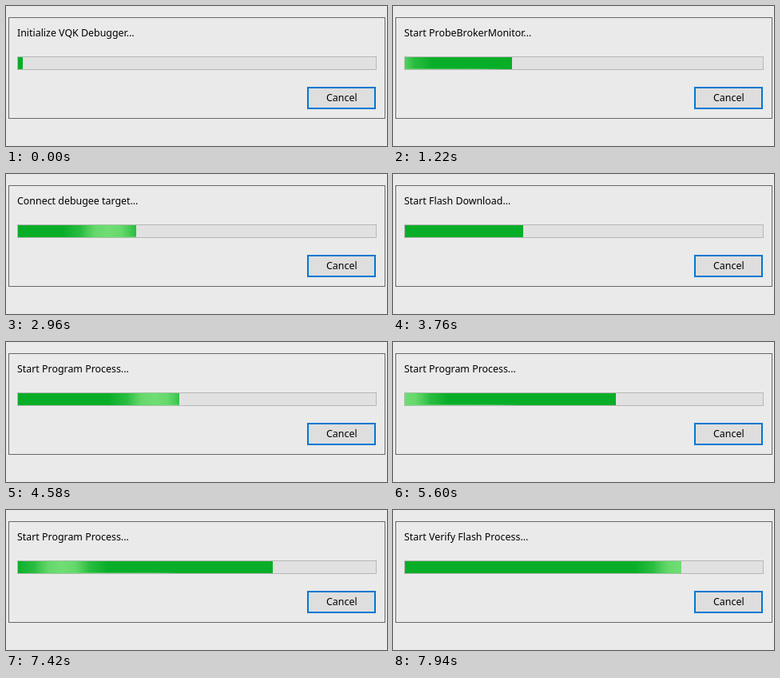
These frames come from a looping animation (477x175 px, 8 s). An HTML page with a canvas:

```html
<!DOCTYPE html>
<html lang="en">
<head>
<meta charset="utf-8">
<title>Progress dialog</title>
<style>
html, body { margin: 0; width: 100%; height: 100%; overflow: hidden; background: #eaeaea; }
canvas { position: absolute; left: 0; top: 0; }
span {
  position: absolute; white-space: pre; color: #000;
  font: 12.4px/16px "Noto Sans", "Open Sans", sans-serif;
}
#label { left: 14px; top: 26px; }
#cancel { left: 401px; top: 107px; }
</style>
</head>
<body>
<canvas id="stage" width="477" height="175"></canvas>
<span id="label"></span>
<span id="cancel">Cancel</span>
<script>
const LOOP = 8000, STEP = 100;
const GLOW_SPEED = 0.58, GLOW_HALF = 57, GLOW_LEAD = 150;
const GREEN = '#09ae28';
const ctx = document.getElementById('stage').getContext('2d');
const label = document.getElementById('label');

// [start time, message]
const messages = [
  [0, 'Initialize VQK Debugger...'],
  [100, 'Start ProbeBrokerMonitor...'],
  [1420, 'Connect debugee target...'],
  [3760, 'Start Flash Download...'],
  [4460, 'Start Program Process...'],
  [7520, 'Start Verify Flash Process...']
];

// [time, chunks done], linear in between
const progress = [
  [0, 1], [700, 20], [1620, 20], [2020, 22], [3740, 22], [4140, 24],
  [4960, 36], [5280, 38.3], [7220, 46.2], [7920, 51]
];

// [start time, glow centre at that time]
const sweeps = [[0, 400], [1220, -8], [2640, -46], [4160, -46], [5500, -46], [7220, -46]];

const latest = (list, t) => list.filter(([start]) => start <= t).pop();

function fillEdge(t) {
  const [t0, n0] = latest(progress, t);
  const [t1, n1] = progress.find(([time]) => time > t) || [LOOP, n0];
  const chunks = Math.floor(n0 + (n1 - n0) * (t - t0) / (t1 - t0));
  return Math.max(21, Math.round(12.55 + 6.83 * chunks));
}

function box(x, y, w, h, fill) {
  ctx.fillStyle = fill;
  ctx.fillRect(x, y, w, h);
}

function frame(x, y, w, h, line, edge, fill) {
  box(x, y, w, h, edge);
  box(x + line, y + line, w - 2 * line, h - 2 * line, fill);
}

function gradient(from, to, stops) {
  const g = ctx.createLinearGradient(from, 0, to, 0);
  for (const [pos, alpha] of stops) g.addColorStop(pos, `rgba(112,221,116,${alpha})`);
  return g;
}

function drawGlow(center, edge) {
  const rise = [[0, 0], [0.2, 0.25], [0.36, 0.85], [0.5, 1]];
  const fall = rise.map(([pos, alpha]) => [1 - pos, alpha]);
  const g = gradient(center - GLOW_HALF, center + GLOW_HALF, [...rise, ...fall]);
  box(15, 64, edge - 15, 15, g);
  ctx.globalAlpha = 0.35;
  box(14, 63, edge - 14, 17, g);
  ctx.globalAlpha = 1;

  // Light running ahead along the bottom edge
  const from = Math.max(15, center);
  const lead = gradient(center, center + GLOW_LEAD, [[0, 0.6], [0.8, 0.5], [1, 0]]);
  if (from < edge) box(from, 78, Math.min(edge, center + GLOW_LEAD) - from, 1, lead);
}

function draw(t) {
  const [start, center] = latest(sweeps, t);
  const time = start + Math.floor((t - start) / STEP + 1e-6) * STEP;
  const edge = fillEdge(time);

  box(0, 0, 477, 175, '#eaeaea');
  frame(3, 14, 472, 127, 1, '#686868', '#eaeaea');
  frame(14, 63, 450, 17, 1, '#b7b7b7', '#e1e1e1');
  box(15, 64, edge - 15, 15, GREEN);
  drawGlow(center + (time - start) * GLOW_SPEED, edge);
  frame(377, 101, 86, 28, 2, '#0078d0', '#dedede');

  const text = latest(messages, t)[1];
  if (label.textContent !== text) label.textContent = text;
}

const begin = performance.now();
function tick(now) {
  draw(Math.max(0, now - begin) % LOOP);
  requestAnimationFrame(tick);
}
draw(0);
requestAnimationFrame(tick);
</script>
</body>
</html>
```
